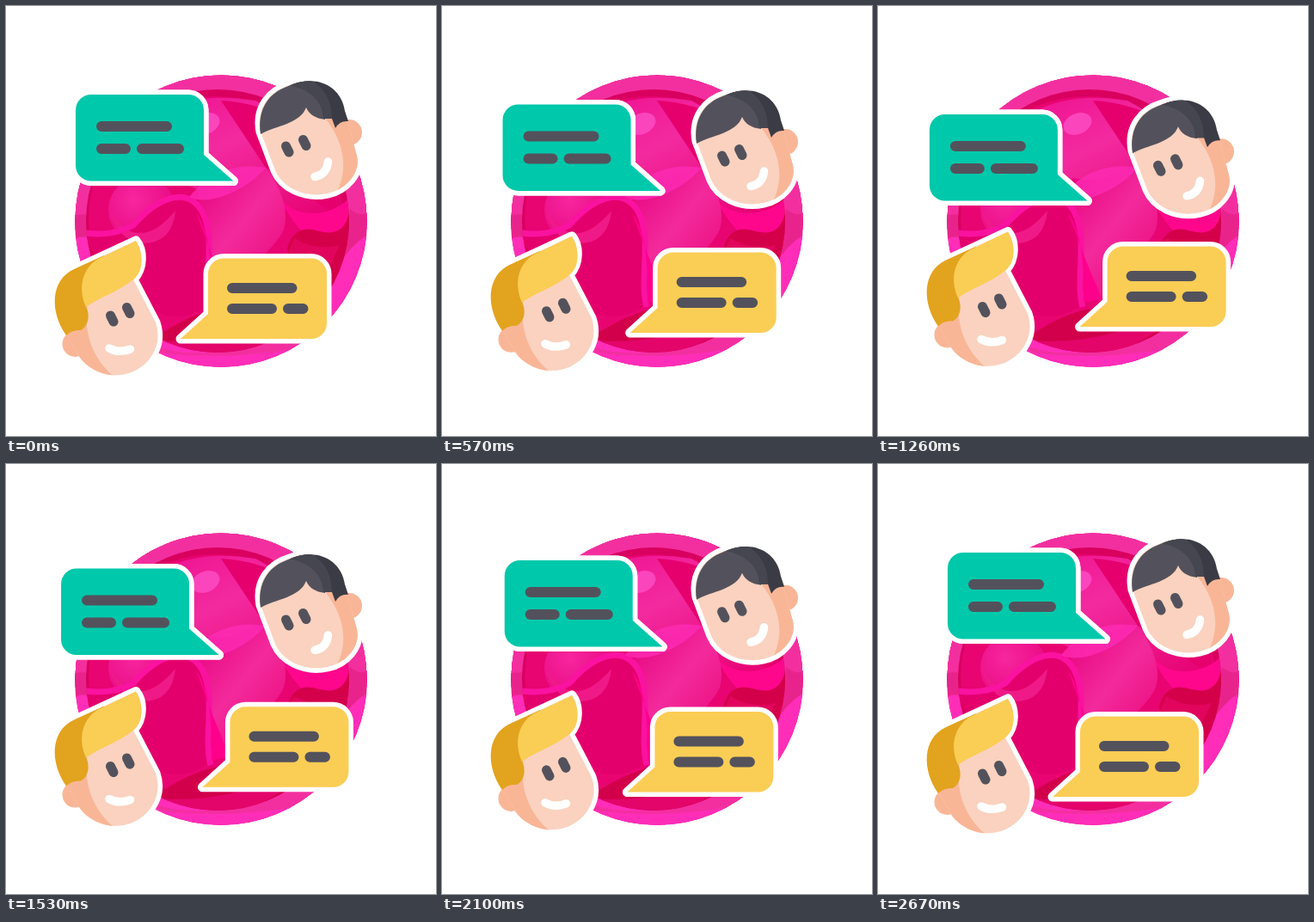
Recreate the animation shown at these times as an HTML page. Size 500 by 500 pixels, loop 2.7 s.

```html
<!DOCTYPE html>
<html lang="en">
<head>
<meta charset="utf-8">
<title>Chat</title>
<style>
html, body { margin: 0; width: 100%; height: 100%; overflow: hidden; background: #fff; }
svg { display: block; width: 100vw; height: 100vh; }
.rim { fill: #fff; stroke: #fff; stroke-width: 11; stroke-linejoin: round; }
.ink { stroke: #53525c; stroke-width: 12; stroke-linecap: round; fill: none; }
.smile { stroke: #fff; stroke-width: 9.5; stroke-linecap: round; fill: none; }
.skin { fill: #fad2bf; }
.shade { fill: #f9b697; }
.gold { fill: #facd55; }
</style>
</head>
<body>
<svg viewBox="0 0 500 500">
  <defs>
    <clipPath id="disc"><circle cx="250" cy="250" r="170" shape-rendering="crispEdges"/></clipPath>
    <clipPath id="core"><circle cx="246" cy="250" r="153"/></clipPath>
    <linearGradient id="glow" x1="0" y1="0" x2="1" y2="1">
      <stop offset="0" stop-color="#ee0a8c"/>
      <stop offset=".45" stop-color="#f32a9f"/>
      <stop offset="1" stop-color="#e60070"/>
    </linearGradient>
    <linearGradient id="heart" x1="0" y1="0" x2=".8" y2="1">
      <stop offset="0" stop-color="#e5007c"/>
      <stop offset=".5" stop-color="#f32a9c"/>
      <stop offset="1" stop-color="#ea0878"/>
    </linearGradient>
    <radialGradient id="orb" cx=".38" cy=".35" r=".65">
      <stop offset="0" stop-color="#f7269f"/>
      <stop offset="1" stop-color="#e90a82"/>
    </radialGradient>
    <path id="faceA" d="M296 146C291 119 306 99 330 92C359 80 388 95 395 126L408 174C413 195 394 214 374 218C346 224 321 210 313 191Z"/>
    <path id="faceB" d="M69 379C52 356 54 319 82 305L151 273C159 283 161 304 148 318L174 368C184 397 163 423 139 428C112 434 90 418 83 404Z"/>
    <clipPath id="clipA"><use href="#faceA"/></clipPath>
    <clipPath id="clipB"><use href="#faceB"/></clipPath>
  </defs>

  <g clip-path="url(#disc)">
    <circle cx="250" cy="250" r="170" fill="#f32f9f" shape-rendering="crispEdges"/>
    <path d="M80 243Q103 240 125 250V420H375L400 236Q412 246 420 240V430H80Z" fill="#e8248c"/>
    <path d="M78 272Q95 262 112 280L140 365Q250 420 370 355Q380 290 422 265V430H78Z" fill="#ff2db7"/>
    <path d="M140 376Q180 410 245 402Q320 400 360 352L385 365L330 400Q250 412 180 403Z" fill="#f32f9f"/>
    <g clip-path="url(#core)">
      <rect x="90" y="90" width="315" height="315" fill="#d9005f"/>
      <ellipse cx="243" cy="247" rx="147" ry="142" fill="#e80471"/>
      <path d="M118 190Q170 90 290 110Q375 155 392 235Q330 255 285 212Q210 235 160 160Z" fill="url(#glow)"/>
      <path d="M250 110Q335 115 372 180Q390 215 390 246Q330 210 302 188Z" fill="#e6006e"/>
      <path d="M300 188Q315 235 345 240T398 225V300Q340 270 322 230Z" fill="#ff078d"/>
      <path d="M327 282Q335 252 365 262Q395 270 400 235V330Q365 350 330 300Z" fill="#d4004a"/>
      <path d="M335 270Q360 285 388 278L365 325Q330 315 327 290Z" fill="#e1055d"/>
      <path d="M226 200Q270 208 302 188C319 210 330 238 323 260C310 288 274 305 258 345Q235 300 222 246Z" fill="url(#heart)"/>
      <circle cx="158" cy="237" r="39" fill="url(#orb)"/>
      <path d="M92 268Q125 270 148 256C174 229 204 210 224 236C242 267 230 312 235 349Q197 375 155 345Q112 310 92 268Z" fill="#e4006c"/>
      <path d="M120 237C145 278 172 268 197 238Q193 278 155 276Q129 270 120 237Z" fill="#ef1a88"/>
      <path d="M92 264Q125 268 148 255C175 224 210 208 228 239C245 270 229 317 238 350" fill="none" stroke="#fa12a0" stroke-width="7"/>
      <path d="M221 241Q241 265 239 345L260 340Q239 291 221 241Z" fill="#ff008c"/>
      <path d="M213 222C240 190 270 183 302 188Q282 211 250 222Q226 229 213 222Z" fill="#ff2db7" opacity=".75"/>
      <path d="M175 385Q230 345 285 350Q345 370 365 329Q345 397 245 400Q205 400 175 385Z" fill="#d2004a"/>
      <path d="M177 389Q260 396 352 351Q307 404 246 404Q205 404 177 389Z" fill="#e3056a"/>
    </g>
    <ellipse cx="232" cy="137" rx="17" ry="12" transform="rotate(-23 232 137)" fill="#fb45bd"/>
  </g>

  <g id="dark">
    <use href="#faceA" class="rim"/>
    <circle cx="399" cy="147" r="15" class="rim"/>
    <circle cx="399" cy="147" r="15" class="shade"/>
    <use href="#faceA" class="skin"/>
    <g clip-path="url(#clipA)">
      <path d="M366 125C385 145 404 180 383 220H420V120Z" class="shade"/>
    </g>
    <path d="M296 149C292 122 304 102 326 94Q343 86 357 88Q375 112 371 132Q354 130 349 118C342 137 314 139 296 149Z" fill="#53525c"/>
    <path d="M334 91C363 80 390 94 394 122L398 134Q388 133 383 142L379 131L369 131C370 112 354 95 334 91Z" fill="#3b3b45"/>
    <path d="M330 92.500Q348 85 358 88C375 101 379 116 379 131H369C369 111 352 96 330 92.500Z" fill="#464650"/>
    <path d="M325.500 163l3.500 7M345.500 155.500l3.500 7" class="ink" style="stroke-width:11"/>
    <path d="M359 198.500Q373 196 374.500 181" class="smile"/>
  </g>

  <g id="fair">
    <use href="#faceB" class="rim"/>
    <circle cx="80.500" cy="393" r="15" class="rim"/>
    <circle cx="80.500" cy="393" r="15" class="shade"/>
    <use href="#faceB" class="skin"/>
    <g clip-path="url(#clipB)">
      <path d="M95 345C89 381 102 412 127 432H70V345Z" class="shade"/>
    </g>
    <path d="M70 383C51 356 51 319 79 306L114 290L93 349C98 360 96 372 87 377Q77 376 70 383Z" fill="#e2a31e"/>
    <path d="M93 350C83 327 89 305 107 294L151 273C160 288 161 309 147 319C129 333 110 338 93 350Z" class="gold"/>
    <path d="M121.500 360l3.500 7M140.500 350.500l3.500 7" class="ink" style="stroke-width:11"/>
    <path d="M120 398Q131 404 144.500 399" class="smile"/>
  </g>

  <g id="green">
    <path id="talkA" class="rim" d="M99 103H212a18 18 0 0 1 18 18V173L264.500 203.500H99a18 18 0 0 1-18-18V121a18 18 0 0 1 18-18Z"/>
    <use href="#talkA" style="fill:#00c8ab;stroke:none" class="top"/>
    <path d="M99 103H212a18 18 0 0 1 18 18V173L264.500 203.500H99a18 18 0 0 1-18-18V121a18 18 0 0 1 18-18Z" fill="#00c8ab"/>
    <path d="M111 140H187M111 166H139M158 166H201" class="ink"/>
  </g>

  <g id="yellow">
    <path class="rim" d="M253 293.500H355a18 18 0 0 1 18 18V369a18 18 0 0 1-18 18H203L235 358V311.500a18 18 0 0 1 18-18Z"/>
    <path class="gold" d="M253 293.500H355a18 18 0 0 1 18 18V369a18 18 0 0 1-18 18H203L235 358V311.500a18 18 0 0 1 18-18Z"/>
    <path d="M263 328H332.500M263 352H309M328 352H345.500" class="ink"/>
  </g>
</svg>
<script>
const LOOP = 2700, STEP = 30, PEAK = 1200, REST = 2640;
// Farthest shift of each part, in stage units
const reach = { dark: [0, 23.3], fair: [0, -11], green: [-22, 24], yellow: [33, -14.5] };
const parts = Object.entries(reach).map(([id, to]) => [document.getElementById(id), to]);

function draw(ms) {
  const t = Math.floor((ms % LOOP) / STEP) * STEP;
  const k = t < PEAK ? t / PEAK : Math.max(0, (REST - t) / (REST - PEAK));
  for (const [el, [x, y]] of parts) el.setAttribute("transform", `translate(${x * k} ${y * k})`);
}

const start = performance.now();
function tick() {
  draw(performance.now() - start);
  requestAnimationFrame(tick);
}
draw(0);
requestAnimationFrame(tick);
</script>
</body>
</html>
```
